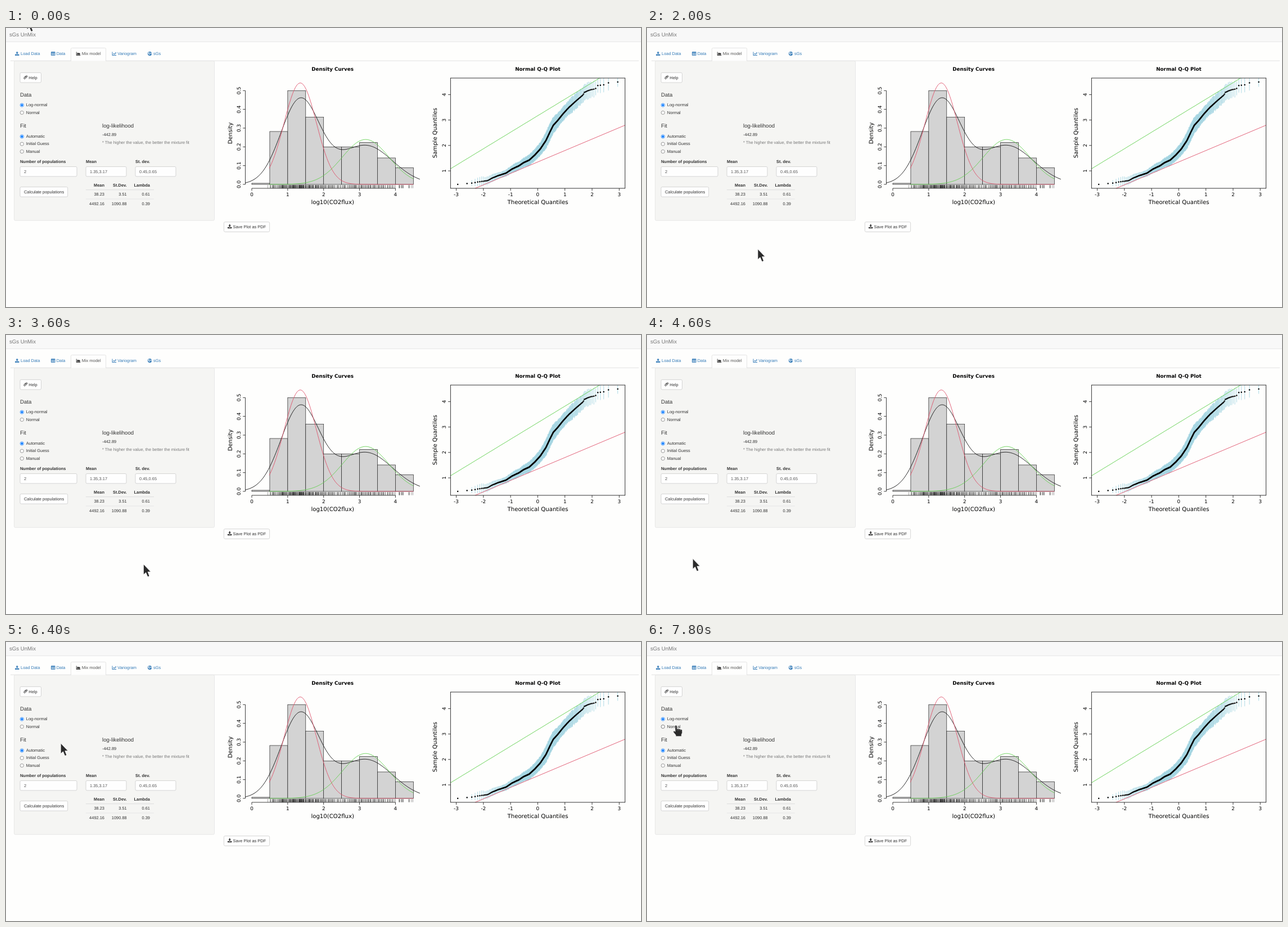
Recreate the animation shown at these times as an HTML page. Size 1129 px wide and 496 px high, loop 8000 ms.

```html
<!DOCTYPE html>
<html lang="en">
<head>
<meta charset="utf-8">
<title>sGs UnMix</title>
<style>
html, body { margin: 0; width: 100%; height: 100%; overflow: hidden; background: #fefefd; }
svg { display: block; width: 100%; height: 100%; text-rendering: geometricPrecision; }
text { font: 7.45px "Liberation Sans", Arial, sans-serif; fill: #333; white-space: pre; }
.big { font-size: 9.65px; }
.bold { font-weight: bold; }
.link { fill: #337ab7; }
.mute { fill: #777; }
.field { fill: #555; }
.end { text-anchor: end; }
.tick, .axis, .main { font-family: "DejaVu Sans", sans-serif; fill: #000; text-anchor: middle; }
.tick { font-size: 8.8px; }
.axis { font-size: 10.15px; }
.main { font-size: 8.82px; font-weight: bold; }
.ln { fill: none; stroke: #000; stroke-width: .75; }
</style>
</head>
<body>
<svg id="stage" viewBox="0 0 1129 496" xmlns="http://www.w3.org/2000/svg"></svg>
<script>
const stage = document.getElementById('stage');
let out = '';
const add = s => { out += s; };
const text = (x, y, s, cls = '') => add(`<text x="${x}" y="${y}" class="${cls}">${s}</text>`);
const upright = (x, y, s, cls) =>
  add(`<text transform="translate(${x} ${y}) rotate(-90)" class="${cls}">${s}</text>`);
const box = (x, y, w, h, fill, stroke = 'none', r = 0, sw = .8) =>
  add(`<rect x="${x}" y="${y}" width="${w}" height="${h}" rx="${r}" fill="${fill}" stroke="${stroke}" stroke-width="${sw}"/>`);
const path = (d, attrs = '') => add(`<path d="${d}" ${attrs}/>`);
const line = (d, color = '#000', w = .75) => path(d, `fill="none" stroke="${color}" stroke-width="${w}"`);
const icon = (x, y, body, color) =>
  add(`<g transform="translate(${x} ${y})" fill="${color}" stroke="none">${body}</g>`);

// Page frame and tabs
const BLUE = '#337ab7', DARK = '#333';
box(0, 0, 1129, 24.5, '#f8f8f8');
line('M0 24.5H1129', '#e7e7e7', 1);
text(6, 15, 'sGs UnMix', 'big mute');
line('M8 58.3H1125', '#ddd', .8);
box(14.5, 58.5, 356, 283.7, '#f5f5f3', '#e3e3e3', 2);
path('M115.4 58.7V37.5Q115.4 35.6 117.4 35.6H175.6Q177.6 35.6 177.6 37.5V58.7', 'fill="#fefefd" stroke="#ddd" stroke-width=".8"');
text(26, 48.3, 'Load Data', 'link');
text(89.7, 48.3, 'Data', 'link');
text(134.7, 48.3, 'Mix model', 'field');
text(198.3, 48.3, 'Variogram', 'link');
text(262, 48.3, 'sGs', 'link');

const tray = '<path d="M0 5H2.2V5.6H5.2V5H7.4V7.4H0Z"/>';
icon(16, 41.7, tray + '<path d="M3.7 0L6 2.6H4.6V5H2.8V2.6H1.4Z"/>', BLUE);
icon(80, 42.3, '<path fill-rule="evenodd" d="M.7 0H6.8Q7.5 0 7.5 .7V5.9Q7.5 6.6 6.8 6.6H.7Q0 6.6 0 5.9V.7Q0 0 .7 0ZM1 1.9V3.3H3.3V1.9ZM4.2 1.9V3.3H6.6V1.9ZM1 4.2V5.6H3.3V4.2ZM4.2 4.2V5.6H6.6V4.2Z"/>', BLUE);
const axes = '<path d="M0 0H.9V5.5H7.5V6.4H0Z"/>';
icon(124.8, 42.6, axes + '<path d="M1.5 4.9V3L3 .8L4.2 2.4L5.5 1.4L7 3.2V4.9Z"/>', DARK);
icon(188.6, 42.6, axes + '<path d="M1.6 3.9L3.2 2.2L4.5 3.4L6.2 1.7L5.4 .9H7.4V2.9L6.8 2.3L4.5 4.6L3.2 3.4L2.2 4.5Z"/>', BLUE);
icon(252, 42, '<circle cx="3.6" cy="3.6" r="3.6"/><path fill="#fefefd" d="M1 2L2.8 .9L3.5 1.8L2.4 3L3.6 4L3 5.9L2.2 5.5L1.9 4.1L.8 3.3ZM4.6 2.2L5.9 1.5L6.6 3L5.8 4.8L5 4.2Z"/>', BLUE);

// Controls
const button = (x, y, w) => box(x, y, w, 17.6, '#fefefe', '#ccc', 2.1);
button(25, 79.4, 37.5);
path('M33.2 88.2L36 85.2Q37 84.5 37.6 85.2Q38.2 86 37.4 86.9L34.2 90.2Q33 91.1 32.1 90.2Q31.4 89.2 32.3 88.1L35.3 84.9M34 88.6L36.3 86.2',
  'fill="none" stroke="#333" stroke-width=".95"');
text(40.3, 90.7, 'Help');
text(25, 121.6, 'Data', 'big');
text(25, 177.4, 'Fit', 'big');
text(171, 177.4, 'log-likelihood', 'big');
text(171, 192.1, '-442.89');
text(171, 205.6, '* The higher the value, the better the mixture fit', 'mute');

const radio = (y, label, on, id) => {
  const c = on ? '#0075ff' : '#767676';
  add(`<circle id="${id}" cx="28.3" cy="${y}" r="3.1" fill="#fff" stroke="${c}" stroke-width=".75"/>`);
  if (on) add(`<circle id="${id}Dot" cx="28.3" cy="${y}" r="1.95" fill="${c}"/>`);
  text(35.8, y + 2.1, label);
};
radio(137.1, 'Log-normal', true, 'logR');
radio(150.5, 'Normal', false, 'normR');
radio(192.9, 'Automatic', true, 'autoR');
radio(206.2, 'Initial Guess', false, 'guessR');
radio(219.6, 'Manual', false, 'manR');

const field = (x, w, label, value) => {
  text(x, 240, label, 'bold');
  box(x, 246.5, w, 17.4, '#fefefe', '#ccc', 2);
  text(x + 7, 257.7, value, 'field');
};
field(25, 101, 'Number of populations', '2');
field(142, 72, 'Mean', '1.35,3.17');
field(230, 72, 'St. dev.', '0.45,0.65');
button(25, 282.6, 84.7);
text(32, 293.7, 'Calculate populations');

const row = (y, cells, cls) =>
  cells.forEach((c, i) => text([175, 214.7, 256][i], y, c, 'end ' + cls));
row(282, ['Mean', 'St.Dev.', 'Lambda'], 'bold');
row(298.4, ['38.23', '3.51', '0.61'], '');
row(314.6, ['4492.16', '1090.88', '0.39'], '');
line('M142 287.7H263', '#ddd', 1);
line('M142 304H263', '#ddd', .6);

button(387.4, 344.8, 81.2);
icon(394, 348.9, tray + '<path d="M2.8 0H4.6V2.4H6L3.7 5L1.4 2.4H2.8Z"/>', DARK);
text(403.5, 355.7, 'Save Plot as PDF');

// Shared plot data
const N = 335;
const knots = [802,278, 819,276.5, 827,276, 840,273.5, 856,271.5, 865,266.5, 875,262.5, 889,258, 900,250.5,
  912,245, 920,239.5, 930,235, 940,226, 950,215, 960,200, 967,185, 973,173, 980,165.5, 990,153, 1000,142,
  1012,131, 1020,124, 1026,119, 1028,114.5, 1037,110.5, 1048,108, 1052,102.3, 1063,101, 1072,97, 1089,96];
const spread = [802,0, 819,1, 828,5, 845,8.5, 862,7, 880,5, 900,7, 920,8, 945,11, 965,15, 990,12, 1010,14,
  1040,14, 1052,13, 1072,14, 1089,7];
const lerp = (p, x) => {
  let i = 0;
  while (i < p.length - 4 && x > p[i + 2]) i += 2;
  const k = Math.min(1, Math.max(0, (x - p[i]) / (p[i + 2] - p[i])));
  return p[i + 1] + k * (p[i + 3] - p[i + 1]);
};
const quantile = p => {
  let lo = -4, hi = 4;
  for (let i = 0; i < 30; i++) {
    const z = (lo + hi) / 2;
    if (1 / (1 + Math.exp(-1.5976 * z - .07056 * z ** 3)) < p) lo = z; else hi = z;
  }
  return lo;
};
let seed = 7;
const rand = () => (seed = seed * 16807 % 2147483647) / 2147483647;
const qx = z => 945.4 + 48.3 * z, qy = v => 299.2 - 45.2 * v;
const dx = v => 437 + 63.85 * v, dy = d => 278 - 333.4 * d;
const points = Array.from({ length: N }, (_, i) => {
  const x = qx(quantile((i + .5) / N));
  return [x, lerp(knots, x)];
});

// Density plot
[.006, .282, .5, .358, .2, .2, .223, .141, .089].forEach((h, i) =>
  box(dx(i / 2), dy(h), 31.925, 333.4 * h, '#d3d3d3', '#222', 0, .7));
const bell = (w, m, s) => x => w / s / Math.sqrt(2 * Math.PI) * Math.exp(-(((x - m) / s) ** 2) / 2);
const curve = (f, a, b, color) => {
  let d = '';
  for (let i = 0; i <= 160; i++) {
    const x = a + (b - a) * i / 160;
    d += (i ? 'L' : 'M') + dx(x).toFixed(2) + ' ' + dy(f(x)).toFixed(2);
  }
  line(d, color, .9);
};
const RED = '#df536b', GREEN = '#61d04f';
const low = bell(.61, 1.35, .54), high = bell(.39, 3.17, .75);
curve(x => low(x) + high(x), -.18, 4.68, '#111');
curve(bell(.61, 1.35, .45), .486, 4.5, RED);
curve(bell(.39, 3.17, .65), .486, 4.5, GREEN);
line(points.map(p => {
  const v = (299.2 - p[1]) / 45.2;
  return `M${Math.min(724, dx(v) + 3 * (rand() - .5)).toFixed(2)} 279.3V284.8`;
}).join(''), '#222', .42);
line('M437 285H692.4M425.5 278V111.3');
for (let i = 0; i < 5; i++) {
  line(`M${dx(i)} 285v4.3`);
  text(dx(i), 298.6, i, 'tick');
}
for (let i = 0; i < 6; i++) {
  line(`M425.5 ${dy(i / 10)}h-4.3`);
  upright(417.2, dy(i / 10), (i / 10).toFixed(1), 'tick');
}
text(580.6, 76.3, 'Density Curves', 'main');
text(580.7, 313.4, 'log10(CO2flux)', 'axis');
upright(401.5, 187, 'Density', 'axis');

// Q-Q plot
add('<clipPath id="qq"><rect x="790.3" y="89" width="310.4" height="196"/></clipPath><g clip-path="url(#qq)">');
line(points.map(([x, y]) => {
  const h = lerp(spread, x) * (.88 + .24 * rand());
  return `M${x.toFixed(2)} ${(y - h).toFixed(2)}v${(2 * h).toFixed(2)}`;
}).join(''), '#a3d5e2', .85);
points.forEach(([x, y]) => add(`<circle cx="${x.toFixed(2)}" cy="${y.toFixed(2)}" r="1.25"/>`));
const trend = (m, s, color) => line(`M${qx(-3.3)} ${qy(m - 3.3 * s)}L${qx(3.3)} ${qy(m + 3.3 * s)}`, color, .9);
trend(1.35, .45, RED);
trend(3.17, .65, GREEN);
add('</g>');
box(790.3, 89, 310.4, 196, 'none', '#000', 0, .8);
for (let i = -3; i <= 3; i++) {
  line(`M${qx(i)} 285v4.3`);
  text(qx(i), 298.6, i, 'tick');
}
for (let i = 1; i <= 4; i++) {
  line(`M790.3 ${qy(i)}h-4.3`);
  upright(782.2, qy(i), i, 'tick');
}
text(945.5, 76.3, 'Normal Q-Q Plot', 'main');
text(945.5, 313.4, 'Theoretical Quantiles', 'axis');
upright(766, 186.7, 'Sample Quantiles', 'axis');

// Pointer shapes, both with the hot spot at 0,0
add(`<g id="pointer" stroke="#fff" stroke-width=".7" stroke-linejoin="round" fill="#2b2b2b">
<path id="arrow" d="M0 0V18.6L4.2 14.8L7 21.6Q8.4 23.2 10.4 20.8L7.6 13.6H12.9Z"/>
<g id="hand"><path d="M-2 1.2Q-.3 -1.4 1.5 1.2L1.9 6.4Q3.4 5 4.9 6.7Q6.5 5.6 7.8 7.4Q10.6 6.6 11 9.4V13.4L9.6 16.6V19.8H-.6V17.4L-4.6 12.4Q-5.6 10.2 -3.4 10L-1.5 11.2Z"/>
<path d="M1.9 6.4V9.6M4.9 6.8V9.8M7.8 7.4V10" fill="none" stroke="#aaa" stroke-width=".5"/></g></g>`);
stage.innerHTML = out;

// Pointer strokes: start time, then one place per step
const LOOP = 8000, STEP = 200;
const strokes = [
  [0, [37.3, -16]],
  [400, [60, 120], [90, 270], [114, 355], [132, 396], [190, 404], [236, 406.5]],
  [2000, [197, 393], [118, 385], [75, 384.5]],
  [2800, [75, 394.5], [105, 400], [168, 405], [224, 408], [244.5, 407.5]],
  [4000, [226, 397], [166, 389], [104, 387], [81.3, 397.5], [79.5, 400], [83.5, 396]],
  [5200, [118, 388], [170, 384.5], [211, 389], [230, 395.5]],
  [6200, [160, 270], [97.3, 180], [66, 147], [47, 125]],
  [7200, [49, 131], [51, 138], [52, 150], [51.7, 148]]
];
const place = t => {
  const s = strokes.filter(k => k[0] <= t).pop();
  return s[Math.min(s.length - 1, 1 + Math.floor((t - s[0]) / STEP))];
};
const get = id => document.getElementById(id);
const pointer = get('pointer'), arrow = get('arrow'), hand = get('hand');
const logR = get('logR'), logDot = get('logRDot'), normR = get('normR');

function draw(t) {
  const [x, y] = place(t);
  const onLog = x > 33 && x < 74 && y >= 130 && y < 143.5;
  const onNorm = x > 33 && x < 61 && y >= 143.5 && y < 157;
  const over = onLog || onNorm;
  pointer.setAttribute('transform', `translate(${x} ${y})`);
  arrow.setAttribute('display', over ? 'none' : 'inline');
  hand.setAttribute('display', over ? 'inline' : 'none');
  const blue = onLog ? '#005cc8' : '#0075ff';
  logR.setAttribute('stroke', blue);
  logDot.setAttribute('fill', blue);
  normR.setAttribute('stroke', onNorm ? '#4f4f4f' : '#767676');
}
function tick() {
  draw(performance.now() % LOOP);
  requestAnimationFrame(tick);
}
tick();
</script>
</body>
</html>
```
